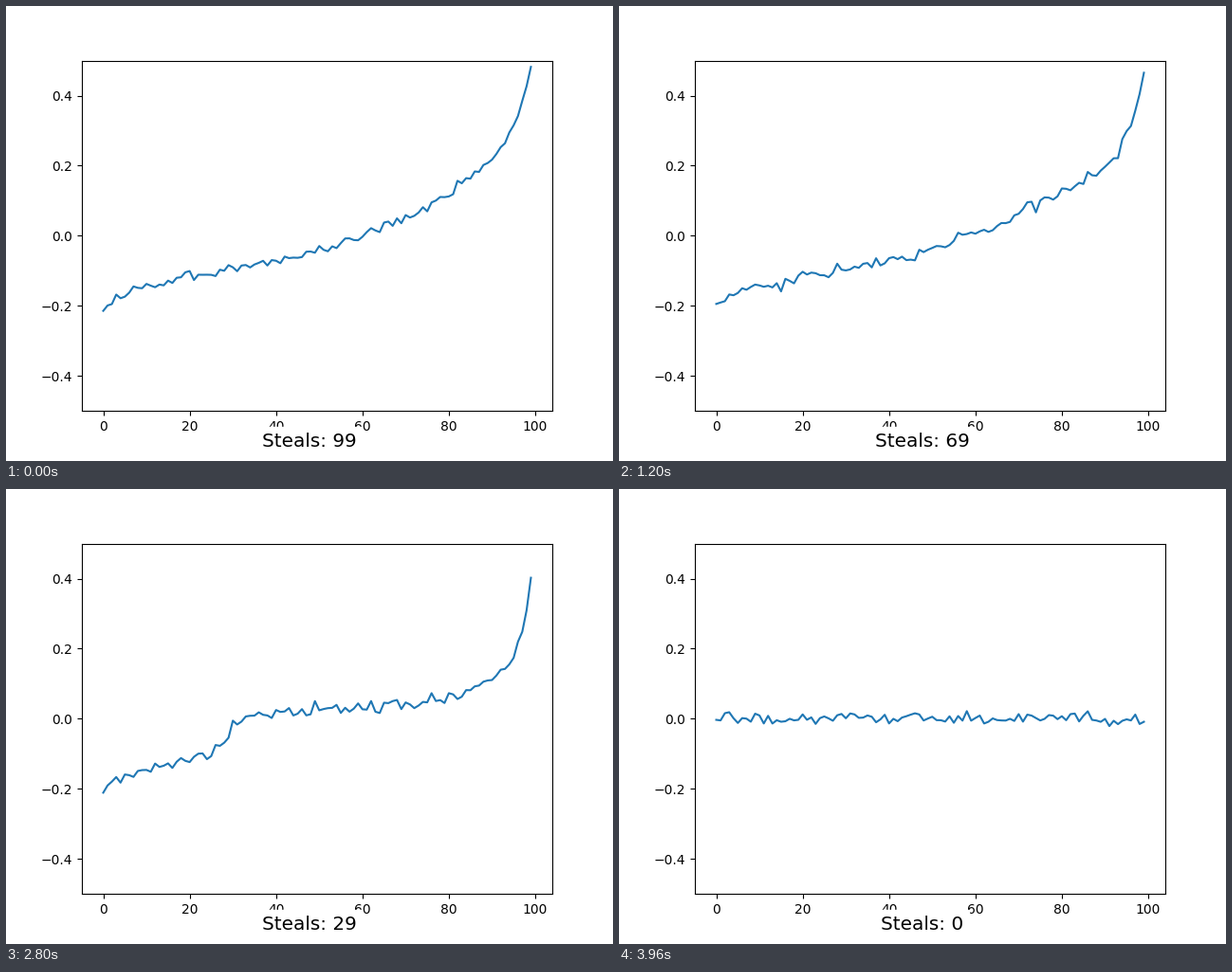
Recreate the animation shown at these times as a matplotlib script. Size 640 by 480 pixels, loop 4000 ms.

```python
import numpy as np
import matplotlib.pyplot as plt
from matplotlib.animation import FuncAnimation

PLAYERS = 100
INTERVAL = 40

x = np.arange(PLAYERS)

# Mean outcome of players whose position is within the steal limit
EARLY_X = [0, 3, 5, 10, 20, 30, 40, 50, 60, 70, 80, 90, 99]
EARLY_Y = [-.205, -.174, -.163, -.145, -.115, -.097, -.075,
           -.045, 0, .05, .115, .24, .5]
early = np.interp(x, EARLY_X, EARLY_Y)


def late_curve(steals):
    """Hyperbolic gain that peaks at the last player."""
    peak = .5 - .5 / (1 + .125 * steals + 1.5e-5 * steals ** 3)
    width = .6 + .11 * steals - .0004 * steals ** 2
    return peak / (1 + (PLAYERS - 1 - x) / width)


def mean_curve(steals):
    if steals == 0:
        return np.zeros(PLAYERS)
    late = late_curve(steals)
    low = np.minimum(early, late)
    d = x - steals
    before = .4 * np.exp(np.minimum(d, 0) / 3)
    after = 1 - .4 * np.exp(-np.maximum(d - 1, 0) / min(5, steals))
    weight = np.where(d <= 0, before, after)
    return low + (late - low) * weight


def outcome(steals):
    mean = mean_curve(steals)
    spread = .0095 * (1 - (2 * mean) ** 2)
    rng = np.random.default_rng(1000 + steals)
    return mean + spread * rng.standard_normal(PLAYERS)


fig, ax = plt.subplots(figsize=(6.4, 4.8), dpi=100)
line, = ax.plot(x, np.zeros(PLAYERS))
ax.set_ylim(-.5, .5)
label = fig.text(.5, 15 / 480, "", fontsize=14.4, ha="center",
                 va="baseline", backgroundcolor="white")


def update(frame):
    steals = PLAYERS - 1 - frame
    line.set_ydata(outcome(steals))
    label.set_text(f"Steals: {steals}")
    return line, label


anim = FuncAnimation(fig, update, frames=PLAYERS, interval=INTERVAL,
                     repeat=True, repeat_delay=0)
plt.show()
```
